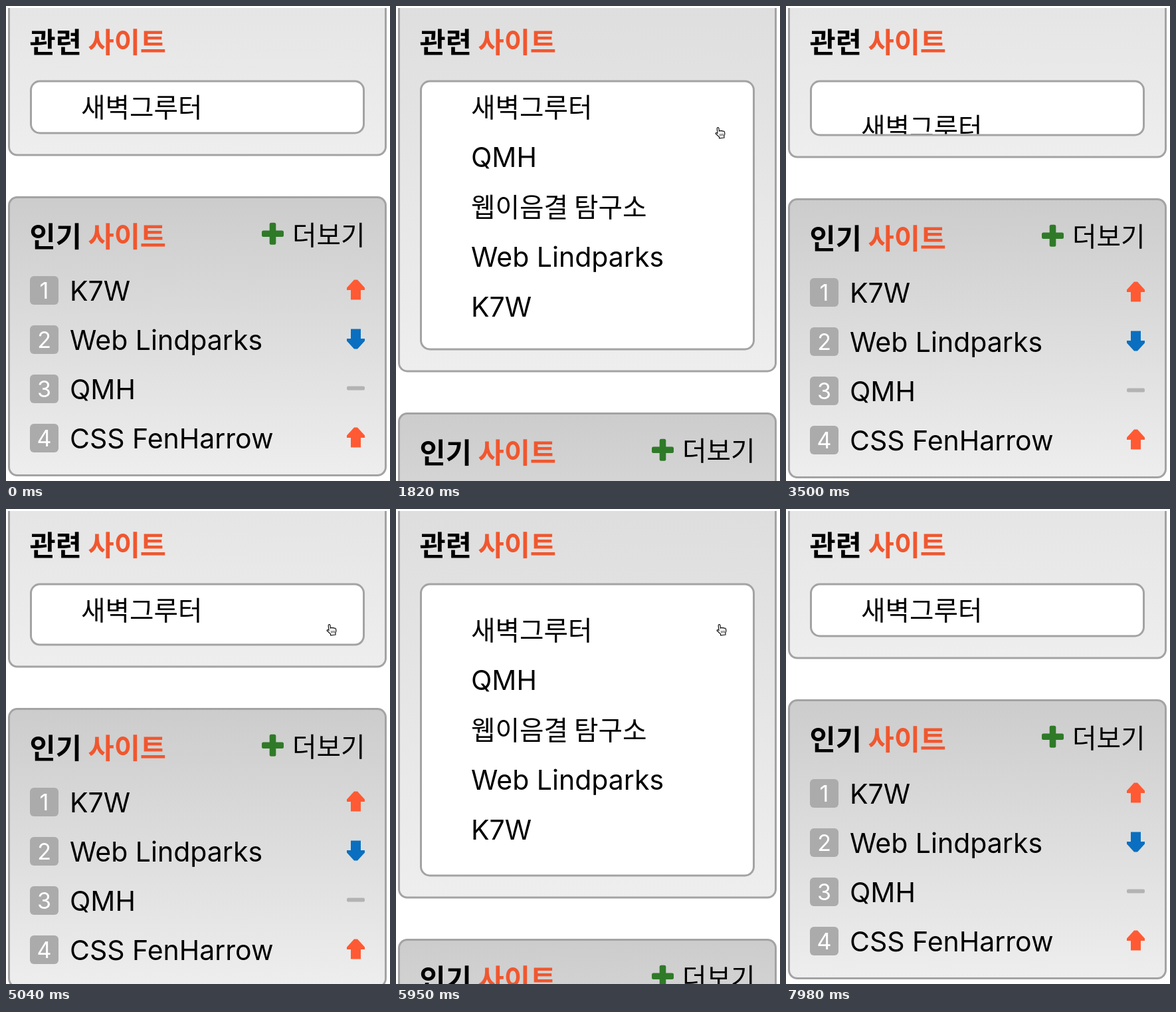
These frames come from a looping animation (578 by 714 pixels, 8 s). An HTML page with a canvas:

```html
<!DOCTYPE html>
<html lang="ko">
<head>
<meta charset="utf-8">
<title>관련 사이트</title>
<style>
  html, body { margin: 0; width: 100%; height: 100%; overflow: hidden; background: #fff; }
  canvas { display: block; }
</style>
</head>
<body>
<canvas id="stage" width="578" height="714"></canvas>
<script>
const ctx = document.getElementById('stage').getContext('2d');

const LOOP = 8000, TICK = 70;
const SLIDE = 500, PAD = 400;
const CLOSED = 81, OPEN = 441, PADDING = 30;
const BOX_TOP = 111.5, PANEL_TOP = -643, ROW = 75;

const KR = '"Noto Sans CJK KR", "Noto Sans CJK", sans-serif';
const LATIN = 'Inter, "Noto Sans CJK KR", sans-serif';
const HANGUL = `39.7px ${KR}`;
const TITLE = `bold 42.6px ${KR}`;
const LABEL = `41px ${LATIN}`;
const BADGE = `34px ${LATIN}`;

const RED = '#f0572f', ARROW = '#ff5a33', BLUE = '#0a6fc0';
const BORDER = '#a3a3a3', GRAY = '#ababab', GREEN = '#2f7a28';

const related = [
  ['새벽그루터', HANGUL],
  ['QMH', LABEL],
  ['웹이음결 탐구소', HANGUL],
  ['Web Lindparks', LABEL],
  ['K7W', LABEL]
];

const popular = [
  ['K7W', 1],
  ['Web Lindparks', -1],
  ['QMH', 0],
  ['CSS FenHarrow', 1]
];

// Each hover opens and closes the list; the pointer shows in between.
const hovers = [
  { open: 1421, close: 3029, show: 1400, hide: 3080, x: 479, y: 182.5 },
  { open: 4979, close: 6848, show: 5040, hide: 6930, x: 481, y: 173.5 }
];

function swing(t, start, duration) {
  const p = Math.min(1, Math.max(0, (t - start) / duration));
  return 0.5 - Math.cos(p * Math.PI) / 2;
}

function hoverSum(t, delay, duration) {
  return hovers.reduce((sum, h) =>
    sum + swing(t, h.open + delay, duration) - swing(t, h.close + delay, duration), 0);
}

function roundRect(x, y, w, h, r, fill) {
  ctx.beginPath();
  ctx.roundRect(x, y, w, h, r);
  ctx.fillStyle = fill;
  ctx.fill();
}

function framed(x, y, w, h, r, fill) {
  roundRect(x, y, w, h, r, BORDER);
  roundRect(x + 3, y + 3, w - 6, h - 6, r - 3, fill);
}

function text(str, x, y, font, color = '#000', align = 'left') {
  ctx.font = font;
  ctx.fillStyle = color;
  ctx.textAlign = align;
  ctx.fillText(str, x, y);
}

function panel(top, bottom) {
  const fill = ctx.createLinearGradient(0, top, 0, bottom);
  fill.addColorStop(0, '#ccc');
  fill.addColorStop(1, '#eee');
  framed(3, top, 570, bottom - top, 14, fill);
}

function title(word, y) {
  text(word, 35.5, y, TITLE);
  text('사이트', 123.5, y, TITLE, RED);
}

function relatedList(height, pad) {
  framed(36, BOX_TOP, 504, height, 15, '#fff');
  ctx.save();
  ctx.beginPath();
  ctx.roundRect(39, BOX_TOP + 3, 498, height - 6, 12);
  ctx.clip();
  related.forEach(([name, font], i) => text(name, 113, 167.3 + i * ROW + pad, font));
  ctx.restore();
}

function trend(dir, y) {
  if (!dir) {
    roundRect(513, y - 3, 27, 6, 2, '#b3b3b3');
    return;
  }
  ctx.save();
  ctx.translate(526.5, y);
  ctx.scale(1, dir);
  ctx.beginPath();
  ctx.moveTo(-2.5, -15);
  ctx.lineTo(2.5, -15);
  ctx.lineTo(13.5, -3);
  ctx.lineTo(13.5, 0.5);
  ctx.lineTo(7.5, 0.5);
  ctx.lineTo(7.5, 15);
  ctx.lineTo(-7.5, 15);
  ctx.lineTo(-7.5, 0.5);
  ctx.lineTo(-13.5, 0.5);
  ctx.lineTo(-13.5, -3);
  ctx.closePath();
  ctx.fillStyle = dir > 0 ? ARROW : BLUE;
  ctx.fill();
  ctx.restore();
}

function popularPanel(top) {
  panel(top, top + 421);
  title('인기', top + 76);
  roundRect(385, top + 51.5, 33, 9.5, 2.5, GREEN);
  roundRect(396.7, top + 39.8, 9.6, 33, 2.5, GREEN);
  text('더보기', 431, top + 72.5, HANGUL);
  popular.forEach(([name, dir], i) => {
    const y = top + 141.5 + i * 74;
    roundRect(36, y - 21.5, 43, 43, 6, GRAY);
    text(i + 1, 57.5, y + 12.5, BADGE, '#fff', 'center');
    text(name, 96, y + 15.5, LABEL);
    trend(dir, y - 1);
  });
}

const hand = new Path2D(
  'M4 8 V2.2 Q4 .6 5.4 .6 Q6.8 .6 6.8 2.2 V6.2 Q8.2 5 9.4 6.4 Q10.8 5.4 12 7 ' +
  'Q14.6 6.4 14.8 9 V11.5 L13.4 14.5 V17 H6 V15 L1.2 9.6 Q1.4 7.4 3.6 9 L4 9.4 Z');
const creases = new Path2D('M7.6 10.5 V14 M9.8 10.5 V14 M12 10.5 V14');

function pointer(x, y) {
  ctx.save();
  ctx.translate(x, y);
  ctx.rotate(-0.1);
  ctx.fillStyle = '#fff';
  ctx.strokeStyle = '#111';
  ctx.lineWidth = 1.2;
  ctx.fill(hand);
  ctx.stroke(hand);
  ctx.lineWidth = 0.8;
  ctx.stroke(creases);
  ctx.restore();
}

function draw(t) {
  const height = CLOSED + (OPEN - CLOSED) * hoverSum(t, 0, SLIDE);
  const pad = PADDING * hoverSum(t, SLIDE, PAD);
  const bottom = BOX_TOP + height + 33;

  ctx.fillStyle = '#fff';
  ctx.fillRect(0, 0, 578, 714);
  panel(PANEL_TOP, bottom);
  ctx.fillStyle = '#fff';
  ctx.fillRect(0, 0, 578, 3);
  title('관련', 70);
  relatedList(height, pad);
  popularPanel(bottom + 60.5);

  const hover = hovers.find(h => t >= h.show && t < h.hide);
  if (hover) pointer(hover.x, hover.y);
}

const start = performance.now();
function loop() {
  const t = (performance.now() - start) % LOOP;
  draw(Math.floor(t / TICK) * TICK);
  requestAnimationFrame(loop);
}
loop();
</script>
</body>
</html>
```
